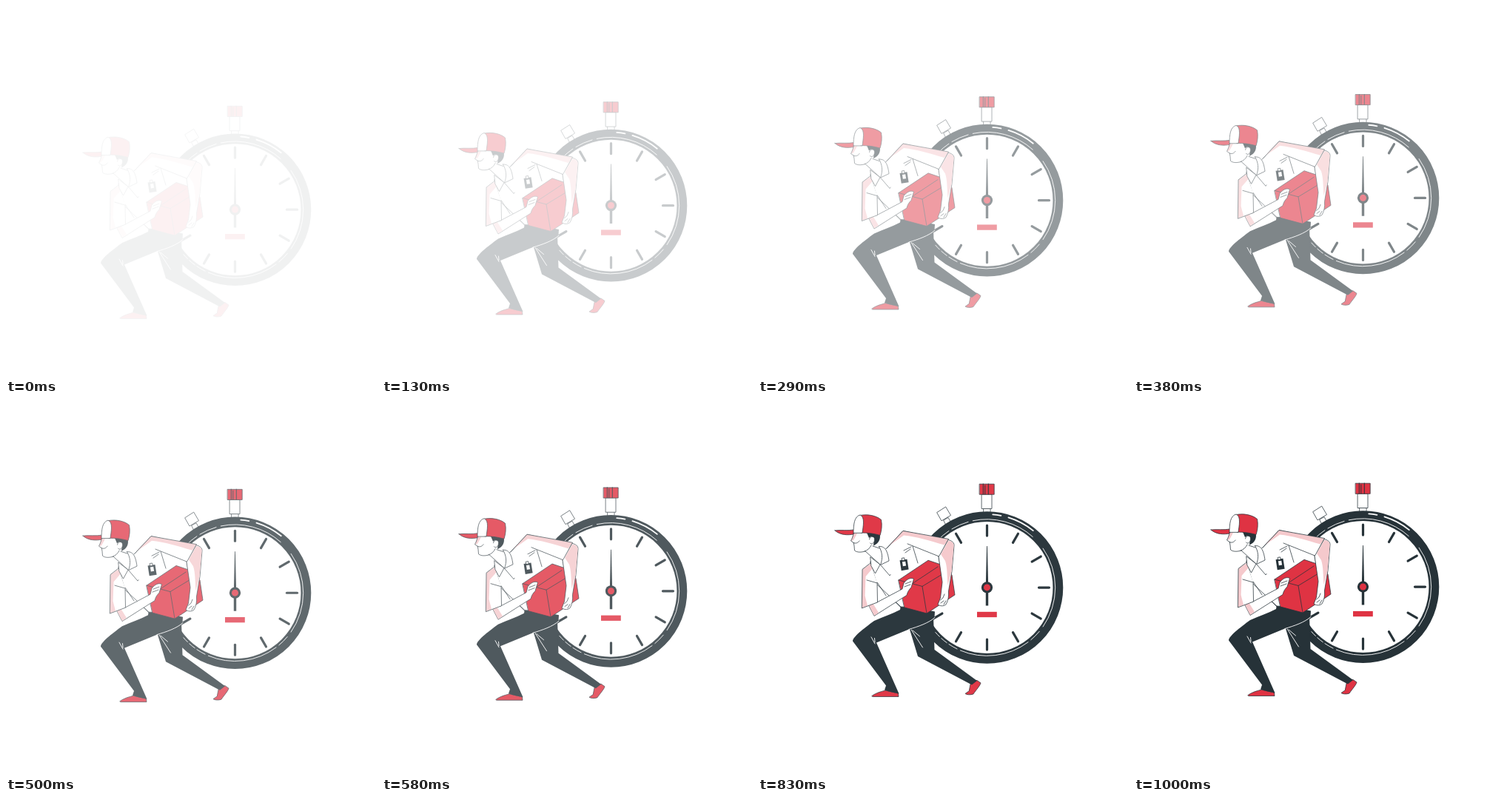
An HTML page that plays this animation: 500 px wide and 500 px high, repeating every 1.04 s.

```html
<!DOCTYPE html>
<html lang="en">
<head>
<meta charset="utf-8">
<title>Express courier</title>
<style>
  html, body { margin: 0; width: 100%; height: 100%; overflow: hidden; background: #fff; }
  svg { display: block; width: 100vw; height: 100vh; }
  .dark { fill: #263238; }
  .red { fill: #df3343; }
  .pink { fill: #f5c9cc; }
  .white { fill: #fff; }
  .line { fill: none; }
  .ink { stroke: #263238; stroke-width: .75; stroke-linejoin: round; stroke-linecap: round; }
  .chalk { fill: none; stroke: #fff; stroke-width: .9; stroke-linecap: round; }
</style>
</head>
<body>
<svg viewBox="0 0 500 500">
  <g id="scene" opacity="0">
    <g id="watch">
      <g class="ink">
        <path class="white" d="M251 156L257 152.500 261.500 160.500 255 164Z"/>
        <path class="white" d="M242 145.500L253.700 138 260.500 149.500 248.300 156.700Z"/>
        <path class="white" d="M305 140H314V146H305Z"/>
        <path class="white" d="M302.500 121H316V140.500H302.500Z"/>
        <path class="red" d="M299.500 107.200H319.200V121.300H299.500Z"/>
        <path class="line" d="M304.300 107V121M306.800 109V121M311.300 107V121" style="stroke-width: 1"/>
      </g>
      <g transform="translate(309.500 247.100)">
        <circle r="95.900" fill="#fff" stroke="#263238" stroke-width="13.800"/>
        <g id="shine" class="chalk"></g>
        <g id="ticks" stroke="#263238" stroke-width="3.200" stroke-linecap="round"></g>
      </g>
      <path class="dark" d="M309.100 191H309.900L311.200 246V271.500H307.800V246Z"/>
      <circle class="dark" cx="309.500" cy="247" r="7.600"/>
      <circle class="red" cx="309.500" cy="247" r="4.500"/>
      <path class="red" d="M296 279.900H322.800V287.200H296Z"/>
    </g>

    <g id="legs">
      <path class="red ink" d="M288 374L296 372.500 301 376C300 380 295 385 291 391 287 392.500 282 392 280 390.500L285 387Z"/>
      <path class="dark" d="M204.500 302L237 286 238.500 331 296 373 289 378.500 216 340Z"/>
      <path class="chalk" d="M207 304L222.500 328M209 305L218.500 313"/>
      <path class="red ink" d="M154 393.500C160 389 166 388 172 386L189.500 390 190 394.500H155Z"/>
      <path class="dark" d="M193 270.500L239 279.500 238.500 287 205 303 160 321.500 190.500 390.500C184 389 178 388 171 385.500L173 379.500 128 319.500C128 314 142 303 157 292 170 286 181 283 192 277Z"/>
      <path class="chalk" d="M204 303.500C216 300 231 295 239 287.500M153 314L158 323M157.500 315.500L158 321"/>
    </g>

    <g id="torso" class="ink">
      <path class="white" d="M152 212L174 194 196 170.500 240 180 246 216 236 276 193 273 161 243Z"/>
      <path class="line" d="M166 217L178 231 179 229.500M209 191L216 214M161 240L173 258M182 263L194 275"/>
    </g>
    <g id="badge" transform="rotate(-9 197.500 216)">
      <path class="dark" d="M192.500 209.500H202.500V223.500H192.500Z"/>
      <path class="white" d="M195.500 212H199.800V218H195.500Z"/>
      <path class="white ink" d="M196 207H199V210.500H196Z"/>
    </g>

    <g id="parcel" class="ink">
      <path class="red" d="M190 237L230 210.300 247 216 262 230 266 257 228 282 198 274Z"/>
      <path class="line" d="M190 237L222 245.500 250 228.500M222 245.500L228 282M209 241.500L243 219"/>
    </g>

    <g id="back-arm">
      <path class="white ink" d="M244 204L257 182.500C262 184 265 186 265 190L262 225 257.500 252C258 259 257 265 254 270 250 273 246 272 243 270L246.500 261 249 240Z"/>
      <path class="pink" d="M257 184C262 184 264.600 187 264.600 190L261.600 225 256.500 244C255.500 232 256 220 253 211L247 202Z"/>
      <path class="line ink" d="M246.500 264L250 261 252 256M247 268L251 265M251 270L254 265"/>
      <path class="white" d="M196 170.500L257.500 181.500 244.500 205 202 188Z"/>
      <path class="pink" d="M177 190.500L196 170.800 257.500 181.700 252 189.500C232 184 214 178 197 176.500Z"/>
      <path class="line ink" d="M174 194L196 170.500 257.500 181.500 244.500 205 202 188M197 197L207 192M199 200L206 195"/>
    </g>

    <g id="front-arm">
      <path class="white ink" d="M149 270L157 285.500 201 257.500C202 253 204 250 207 247L210.500 235.500C206 233 201 236 197 241L195 249 161 267Z"/>
      <path class="pink" d="M149.300 270L157 285 163 281 155 268Z"/>
      <path class="line ink" d="M198 246L206 243M199 242L207 239"/>
      <path class="white" d="M152 214L141 222.500 140.300 275 161.500 267 161 241Z"/>
      <path class="pink" d="M152 215L141.300 222.500 140.600 274.500 148 271.500 144.500 258 145.500 232 155 221Z"/>
      <path class="line ink" d="M152 214L141 222.500 140.300 275 161.500 267 161 241 147 237"/>
    </g>

    <g id="head">
      <path class="white" d="M129 173L125.500 184 129.200 186.500 130.500 197C134 200 140 199.500 145 198L152 206 165 216 174 196 158 187 164 174Z"/>
      <path class="pink" d="M129 174L134 174 129 183 126 184Z"/>
      <path class="line ink" d="M129 174C128.500 178 127 181 125.500 184L129.200 186.500 130 191 130.500 197C134 200 140 199.500 145 198L165 216M129 186.500C132 188 135 187 137 184M155 191L164 194M144 198C148 197 151 194 153 190"/>
      <path class="dark" d="M147 173L164.500 174C166 181 164 187 156 190.500L157 181 153 178 150 180Z"/>
      <path class="white ink" d="M150.500 182C151 177 157.500 177 157.500 182 157.500 187 153.500 190 151.500 187"/>
      <g class="ink">
        <path class="white" d="M152 206L165 216 158.500 228 153 218Z"/>
        <path class="white" d="M163.500 191.500C171 191 175 196 177 211L165.500 216.500C169 207 168 199 163.500 191.500Z"/>
        <path class="red" d="M104 170C112 169 121 170.500 130 169L129 175C122 176.500 111 176.500 104 170Z"/>
        <path class="red" d="M138 149.500C149 147.500 160 150 166.500 155.500 168 163 167 170 165 176.500 156 174 148 173 139 173Z"/>
        <path class="white" d="M129 173C129 162 130 151 138 149 145 151.500 142 165 141 173Z"/>
      </g>
    </g>
  </g>
</svg>
<script>
  const LOOP = 1040, FRAME = 125 / 3, STEPS = 25, RISE = 30;
  const svgNS = "http://www.w3.org/2000/svg";
  const byId = id => document.getElementById(id);
  const scene = byId("scene");

  function addPath(parent, d, width) {
    const path = document.createElementNS(svgNS, "path");
    path.setAttribute("d", d);
    if (width) path.style.strokeWidth = width;
    parent.append(path);
  }

  // Angles run clockwise in degrees from twelve o'clock.
  function polar(radius, angle) {
    const a = angle * Math.PI / 180;
    return `${radius * Math.sin(a)} ${-radius * Math.cos(a)}`;
  }

  function addArc(radius, from, to, width) {
    addPath(byId("shine"), `M${polar(radius, from)}A${radius} ${radius} 0 0 1 ${polar(radius, to)}`, width);
  }

  for (let hour = 0; hour < 12; hour++) {
    const angle = hour * 30;
    addPath(byId("ticks"), `M${polar(70, angle)}L${polar(84, angle)}`);
  }

  [[4.5, 11], [17, 39]].forEach(([from, to]) => addArc(99, from, to, 1.8));
  [[-46, -34], [-31, -16], [-12, 42], [55, 125], [130, 140], [143, 203], [206, 214], [216, 222], [224, 229]]
    .forEach(([from, to]) => addArc(92.3, from, to));

  function draw(time) {
    // 24 steps per second, on a clock that counts in hundredths.
    const tick = Math.floor(time % LOOP / 10) * 10;
    const step = Math.floor((tick + 4.9) / FRAME);
    const progress = Math.sin((step + 1) / STEPS * Math.PI / 2);
    scene.setAttribute("opacity", progress);
    scene.setAttribute("transform", `translate(0 ${RISE * (1 - progress)})`);
  }

  const start = performance.now();
  function loop() {
    draw(performance.now() - start);
    requestAnimationFrame(loop);
  }
  loop();
</script>
</body>
</html>
```
